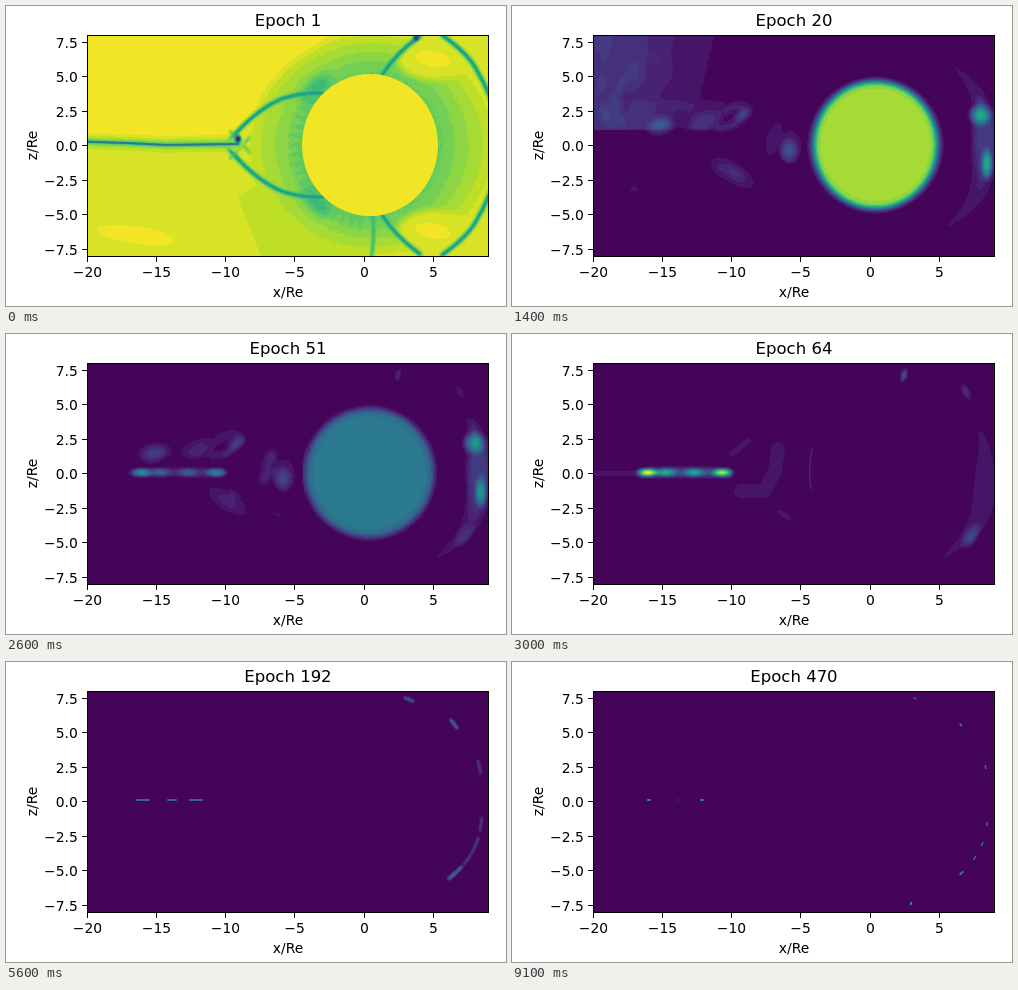
An HTML page with a canvas for the animation above (9.2 s loop, 500 by 300 pixels).

```html
<!DOCTYPE html>
<html lang="en">
<head>
<meta charset="utf-8">
<title>Epoch plot</title>
<style>
html, body { margin: 0; width: 100%; height: 100%; overflow: hidden; background: #fff; }
canvas, svg { position: absolute; left: 0; top: 0; }
text { font: 13.89px "DejaVu Sans", sans-serif; text-anchor: middle; }
#title { font-size: 16.5px; }
.y { text-anchor: end; }
path, rect { fill: none; stroke: #000; stroke-width: 1; }
</style>
</head>
<body>
<canvas id="plot" width="500" height="300"></canvas>
<svg width="500" height="300">
  <rect x="81.5" y="29.5" width="401" height="221"/>
  <g id="axes"></g>
  <text id="title" x="282" y="20"></text>
  <text x="282" y="291">x/Re</text>
  <text transform="translate(31 139.5) rotate(-90)">z/Re</text>
</svg>
<script>
const W = 500, H = 300, LEVELS = 26, MID = 139;
const title = document.getElementById('title');
const view = document.getElementById('plot').getContext('2d');

// Axes
const signed = (n, digits) => (n < 0 ? '−' : '') + Math.abs(n).toFixed(digits);
let marks = '';
for (let i = 0; i < 6; i++) {
  const x = Math.floor(81.5 + 69.14 * i) + 0.5;
  marks += `<path d="M${x} 251v5"/><text x="${x}" y="271">${signed(i * 5 - 20, 0)}</text>`;
}
for (let i = 0; i < 7; i++) {
  const y = Math.floor(36 + 34.55 * i) + 0.5;
  marks += `<path d="M81 ${y}h-5"/><text class="y" x="71.8" y="${y + 5}">${signed(7.5 - 2.5 * i, 1)}</text>`;
}
document.getElementById('axes').innerHTML = marks;

// Colour bands
const stops = '440154 482475 414487 355f8d 2a788e 21918c 22a884 44bf70 7ad151 bddf26 fde725'.split(' ')
  .map(s => [0, 2, 4].map(i => parseInt(s.slice(i, i + 2), 16)));
const bands = Array.from({ length: LEVELS }, (_, q) => {
  const v = q ? (q + 0.5) / LEVELS * 10 : 0.1, i = Math.floor(v);
  return stops[i].map((c, j) => c + (stops[i + 1][j] - c) * (v - i));
});

// Each scene is a grey field; levels run from 0 to 100.
const gray = v => `rgb(${Array(3).fill(Math.round(v * 2.55))})`;
function layer() {
  const c = document.createElement('canvas');
  c.width = W;
  c.height = H;
  return c.getContext('2d', { willReadFrequently: true });
}
function oval(x, y, rx, ry = rx, deg = 0) {
  const p = new Path2D();
  p.ellipse(x, y, rx, ry, deg * Math.PI / 180, 0, 7);
  return p;
}
function scene(base, paint) {
  const g = layer();
  g.lineCap = g.lineJoin = 'round';
  g.fillStyle = gray(base);
  g.fillRect(0, 0, W, H);
  const prepare = (level, blur) => {
    g.filter = `blur(${blur}px)`;
    g.fillStyle = g.strokeStyle = gray(level);
  };
  paint({
    g,
    fill(level, blur, path) {
      prepare(level, blur);
      g.fill(typeof path === 'string' ? new Path2D(path) : path);
    },
    line(level, blur, width, path) {
      prepare(level, blur);
      g.lineWidth = width;
      g.stroke(new Path2D(path));
    },
    // Adds a soft hill to the field.
    glow(peak, x, y, rx, ry = rx, deg = 0) {
      const grad = g.createRadialGradient(0, 0, 0, 0, 0, 1);
      for (let r = 0; r <= 1; r += 0.125)
        grad.addColorStop(r, `rgba(255,255,255,${peak / 100 * (1 - r * r) ** 2})`);
      g.save();
      g.filter = 'none';
      g.globalCompositeOperation = 'lighter';
      g.translate(x, y);
      g.rotate(deg * Math.PI / 180);
      g.scale(rx, ry);
      g.fillStyle = grad;
      g.fill(oval(0, 0, 1));
      g.restore();
    }
  });
  return g.canvas;
}

// Front of the bow on the right, with lines and tapered bands along it
const bow = y => 476 - 26 * Math.abs((y - MID + 1) / 72.5) ** 3;
const bowLine = (y, h) => `M${bow(y - h / 2)} ${y - h / 2}L${bow(y)} ${y}L${bow(y + h / 2)} ${y + h / 2}`;
function bowBand(y0, y1, r) {
  const p = new Path2D();
  for (let y = y0 + 2; y < y1; y += 2)
    p.addPath(oval(bow(y) - 3, y, r * Math.sin(Math.PI * (y - y0) / (y1 - y0))));
  return p;
}

const start = scene(98, ({ fill, line }) => {
  fill(94, 3, 'M60 138L235 130L335 20H510V270H60z');
  fill(98, 2, oval(130, 229, 40, 9, 8));
  fill(90, 4, 'M232 190L300 160L365 265H262z');
  for (let i = 0; i < 4; i++) fill(89 - 4 * i, 4, oval(366, MID, 120 - 14 * i, 108 - 9 * i));
  for (let a = 1.7; a < 3.8; a += 0.12) {
    const c = Math.cos(a), s = Math.sin(a);
    line(73, 1.5, 2, `M${364 + 68 * c} ${MID + 71 * s}L${364 + 80 * c} ${MID + 84 * s}`);
  }
  for (const s of [-1, 1]) {
    const Y = d => MID + s * d;
    const lobe = `M220 ${Y(0)}Q246 ${Y(33)} 275 ${Y(46)}Q296 ${Y(53)} 318 ${Y(52)}`;
    const cusp = `M376 ${Y(70)}Q390 ${Y(92)} 414 ${Y(109)}`;
    const front = `M436 ${Y(110)}Q460 ${Y(93)} 469 ${Y(78)}T485 ${Y(46)}`;
    fill(66, 4, oval(310, Y(56), 18, 8, s * 45));
    fill(94, 3, oval(428, Y(85), 36, 20));
    fill(98, 2, oval(427, Y(86), 19, 8, 10));
    for (const path of [lobe, cusp, front]) {
      line(76, 1.5, 5, path);
      line(45, 0.8, 2.2, path);
    }
    line(70, 1, 2, `M224 ${Y(14)}L244 ${Y(-8)}`);
  }
  const tail = 'M60 135L120 137L160 139L232 138';
  line(87, 2, 12, tail);
  line(72, 1, 5, tail);
  line(42, 0.7, 2.2, tail);
  line(65, 1, 3, 'M367 206Q369 230 365 255');
  fill(3, 0.8, oval(232, 133, 2.6, 3.4));
  fill(5, 0.8, oval(410, 32, 2.5));
  fill(98, 0.4, oval(364, MID, 68, 71));
});

const early = scene(0, ({ g, fill, line, glow }) => {
  const fade = g.createLinearGradient(81, 80, 232, 116);
  [34, 31, 16, 8, 4].forEach((v, i) => fade.addColorStop(i / 4, gray(v)));
  g.fillStyle = fade;
  g.fill(new Path2D('M60 20H239L236 45L217 75L206 124H60z'));
  let seed = 8;
  const random = () => (seed = seed * 16807 % 2147483647) / 2147483647;
  for (let i = 0; i < 12; i++) glow(5, 85 + 95 * random(), 30 + 80 * random(), 14, 20);
  glow(9, 94, 108, 18, 24);
  fill(19, 2, oval(115, 97, 5, 12, 8));
  fill(3, 2, oval(168, 118, 10, 13));
  fill(0, 1, 'M60 125H260V300H60z');
  line(5.5, 2, 18, 'M76 238L88 184L140 178L202 163');
  glow(5, 122, 183, 24, 14, -12);
  fill(94, 2.4, oval(363.5, MID, 60.5, 63.5));
});

const middle = scene(0, ({ fill, line, glow }) => {
  line(6, 1.5, 28, 'M102 109L160 108L218 111L234 104');
  line(6, 1, 7, 'M98 32L93 52M112 72L98 100');
  glow(32, 148, 120, 20, 13, -15);
  glow(15, 192, 116, 24, 13, -25);
  line(19, 2, 5, 'M206 123L222 119L236 104Q222 96 212 106');
  glow(20, 230, 109, 12, 8, -30);
  fill(9, 1.2, oval(262, 133, 8, 17, 18));
  fill(9, 1.2, oval(278, 141, 12, 17));
  glow(34, 277, 144, 12, 16);
  fill(8, 1, oval(221, 167, 25, 11, 32));
  glow(14, 222, 167, 22, 10, 32);
  fill(8, 1, bowBand(54, 228, 14));
  fill(18, 2, bowBand(85, 188, 13));
  fill(30, 2, bowBand(88, 178, 8));
  glow(75, 468, 109, 15, 14);
  glow(75, 475, 158, 8, 20);
  fill(79, 3, oval(363.5, MID, 64, 64));
});

const late = scene(0, ({ fill, line, glow }) => {
  line(7, 1, 5, 'M70 139.5H130');
  line(26, 2, 8, 'M130 139L160 138L216 139');
  for (const [x, peak] of [[136, 75], [154, 38], [182, 35], [210, 65]]) glow(peak, x, 138.5, 14, 6);
  fill(7, 0.8, bowBand(92, 228, 11));
  glow(16, 459, 203, 9, 18, 30);
  glow(22, 392, 41, 5, 10, 15);
  glow(12, 454, 58, 6, 13, -30);
  line(7, 1, 14, 'M266 115L263 138L252 157L229 157');
  line(7, 1, 6, 'M220 120L236 107');
  fill(8, 0.8, oval(272, 181, 8, 3, 30));
  line(8, 0.7, 2, 'M300 114Q296 135 299 155');
});

// The last spots keep their places and shrink.
const spots = (size, level, blur) => scene(0, ({ line }) => {
  const wide = 1.2 + 1.4 * size;
  for (const x of [137, 190]) line(level * 1.2, 0.6, 1.6, `M${x - 6 * size} 138h${12 * size}`);
  line(level * size * 1.2, 0.6, 1.6, `M${166 - 4 * size} 138h${8 * size}`);
  line(level * 0.8, blur, wide, `M${403 - 4 * size} 36l${8 * size} ${3 * size}`);
  line(level, blur, wide, `M${449 - 4 * size} ${63 - 5 * size}l${6 * size} ${8 * size}`);
  for (const y of [105, 162, 182, 196]) line(level * (1 - size * 0.45), blur, wide * 0.9, bowLine(y, 13 * size));
  line(level, blur, wide * 1.2, bowLine(211, 11 * size));
  line(level * (1 - size) * 1.5, 0.6, 1.8, `M399 ${241 - 2 * size}v${3 * size + 1}`);
});

// step and scene
const keys = [[2, early], [22, middle], [30, late],
  [56, spots(1, 38, 0.8)], [72, spots(0.55, 42, 0.6)], [91, spots(0.2, 46, 0.5)]];
const mix = layer();

function draw(step) {
  mix.globalAlpha = 1;
  if (step < 2) {
    mix.drawImage(step ? early : start, 0, 0);
  } else {
    const n = Math.max(1, keys.findIndex(k => k[0] >= step));
    const [s0, from] = keys[n - 1], [s1, to] = keys[n];
    mix.drawImage(from, 0, 0);
    mix.globalAlpha = (step - s0) / (s1 - s0);
    mix.drawImage(to, 0, 0);
  }
  const img = mix.getImageData(82, 30, 400, 220), px = img.data;
  for (let i = 0; i < px.length; i += 4) {
    const c = bands[Math.min(LEVELS - 1, Math.floor(px[i] / 255 * LEVELS))];
    px[i] = c[0];
    px[i + 1] = c[1];
    px[i + 2] = c[2];
  }
  view.putImageData(img, 82, 30);
  title.textContent = 'Epoch ' + Math.round(1.4 + 0.6 * step + 0.05 * step * step);
}

let shown = -1;
const t0 = performance.now();
function tick() {
  const step = Math.floor((performance.now() - t0) / 100) % 92;
  if (step !== shown) draw(shown = step);
  requestAnimationFrame(tick);
}
tick();
</script>
</body>
</html>
```
